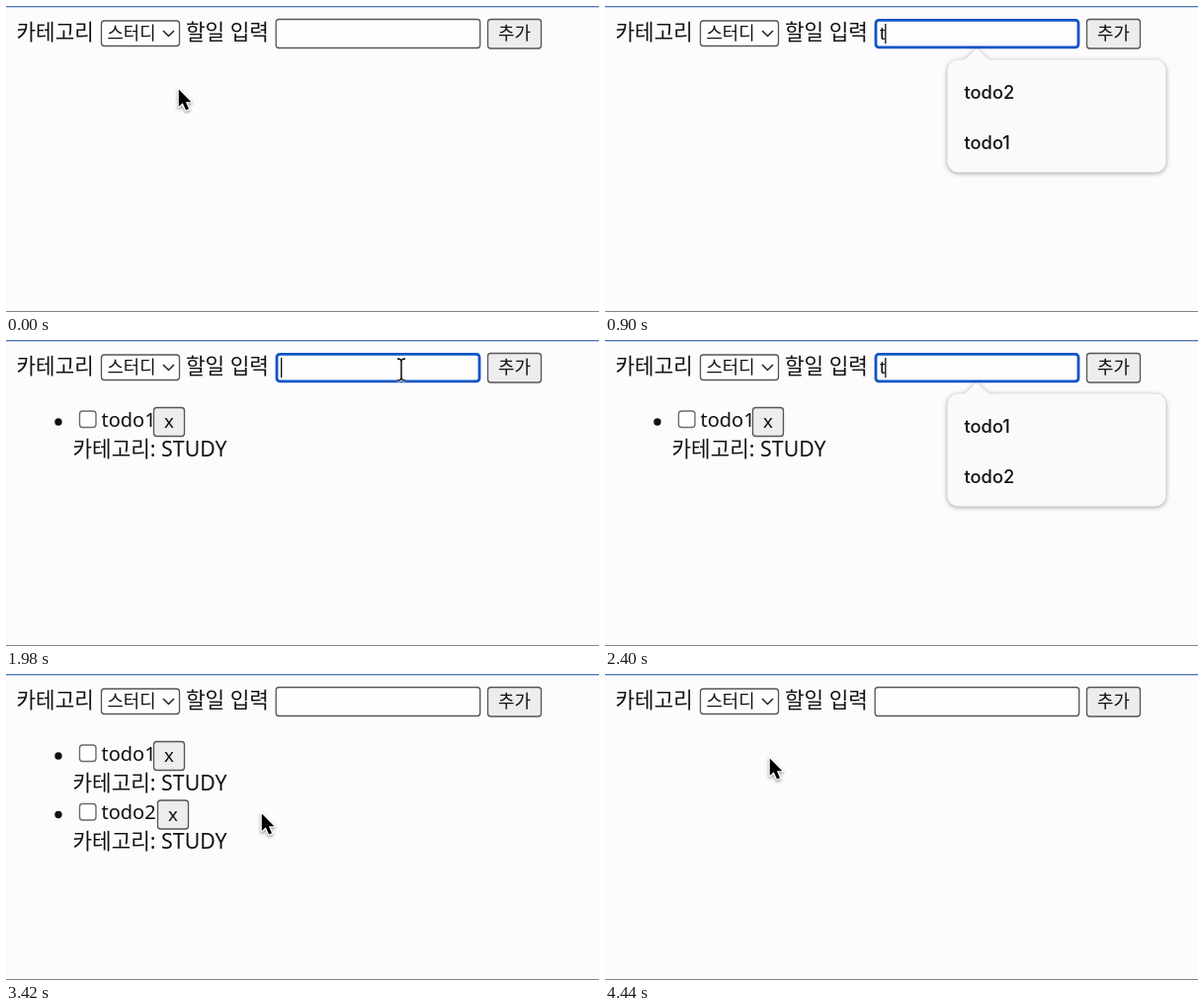
These frames come from a looping animation (600x310 px, 4860 ms). An HTML page with a canvas:

```html
<!DOCTYPE html>
<html lang="ko">
<head>
<meta charset="utf-8">
<style>
  html, body { margin: 0; width: 600px; height: 310px; overflow: hidden; }
  canvas { display: block; }
</style>
</head>
<body>
<canvas id="stage" width="600" height="310"></canvas>
<script>
const ctx = document.getElementById('stage').getContext('2d');
const LOOP = 4860, TICK = 60, ROW = 59.5;
const PAGE = '#fdfbfe', INK = '#111', BORDER = '#555', BLUE = '#0b55c4';
const KOREAN = '"Noto Sans", "Noto Sans CJK KR", sans-serif';
const ARIAL = '"Liberation Sans", Arial, sans-serif';

// [time, value] lists: the latest entry that has started applies.
const typed = [
  [0, ''], [720, 't'], [1020, 'to'], [1080, 'tod'], [1140, 'todo'], [1260, 'todo1'], [1740, ''],
  [2340, 't'], [2460, 'to'], [2520, 'tod'], [2580, 'todo'], [2700, 'todo2'], [3180, '']
];
const focus = [[0, false], [540, true], [1740, false], [1980, true], [3180, false]];
const caret = [[0, false], [540, true], [1440, false], [1980, true], [2880, false]];
const popup = [
  [0, null], [600, 'tall'], [720, null], [900, 'short'], [1320, null],
  [2100, 'tall'], [2340, null], [2400, 'short'], [2820, null]
];
const list = [
  [0, []], [1800, ['todo1']], [3240, ['todo1', 'todo2']], [3840, ['todo2']], [4440, []]
];
const pressed = [
  [0, false], [1740, true], [1800, false], [3180, true], [3240, false],
  [3720, true], [3840, false], [4320, true], [4380, false]
];
const pointerShown = [[0, true], [720, false], [1440, true], [2340, false], [2880, true]];
const pointerPath = [
  [0, 174, 83], [60, 174, 83], [180, 222, 74], [360, 365, 40], [480, 400, 30],
  [1380, 400, 30], [1440, 415, 28], [1560, 475, 20], [1680, 499, 25], [1740, 499, 25],
  [1920, 400, 30], [2820, 400, 30], [2880, 440, 30], [3000, 566, 29], [3120, 514, 33],
  [3180, 514, 33], [3360, 335, 112], [3420, 258, 140], [3540, 186, 108], [3660, 166, 84],
  [LOOP, 166, 84]
];

const at = (steps, t) => steps.filter(s => s[0] <= t).pop()[1];

function pointerAt(t) {
  const i = Math.max(1, pointerPath.findIndex(p => p[0] >= t));
  const [t0, x0, y0] = pointerPath[i - 1], [t1, x1, y1] = pointerPath[i];
  const k = (t - t0) / (t1 - t0);
  return { x: x0 + (x1 - x0) * k, y: y0 + (y1 - y0) * k };
}

const inside = (p, x, y, w, h) => p && p.x >= x && p.x <= x + w && p.y >= y && p.y <= y + h;

function text(str, x, y, font, align = 'left') {
  ctx.font = font;
  ctx.textAlign = align;
  ctx.fillStyle = INK;
  ctx.fillText(str, x, y);
}

function box(x, y, w, h, fill, stroke = BORDER, line = 1.3, radius = 3) {
  ctx.beginPath();
  ctx.roundRect(x, y, w, h, radius);
  ctx.fillStyle = fill;
  ctx.fill();
  ctx.strokeStyle = stroke;
  ctx.lineWidth = line;
  ctx.stroke();
}

function button(label, x, y, w, h, font, baseline, pointer, down) {
  const over = inside(pointer, x, y, w, h);
  box(x, y, w, h, over ? (down ? '#f4f3f5' : '#dddcde') : '#edecee');
  text(label, x + w / 2, baseline, font, 'center');
}

function drawForm(t, pointer) {
  text('카테고리', 10.5, 33.5, '21.3px ' + KOREAN);
  box(96.5, 15, 79, 25.5, '#fefdff');
  text('스터디', 102.5, 34, '17.8px ' + KOREAN);
  ctx.beginPath();
  ctx.moveTo(159, 25);
  ctx.lineTo(164.5, 30.5);
  ctx.lineTo(170, 25);
  ctx.strokeStyle = '#222';
  ctx.lineWidth = 1.5;
  ctx.stroke();

  text('할일 입력', 182, 33.5, '21.3px ' + KOREAN);
  if (at(focus, t)) box(274, 14.3, 205, 27.5, '#fefdff', BLUE, 2.8);
  else box(273.2, 13.5, 206.5, 29, '#fefdff');
  const value = at(typed, t);
  text(value, 278, 34, '18.66px ' + ARIAL);
  if (at(caret, t)) ctx.fillRect(278 + ctx.measureText(value).width, 18, 1.3, 20);

  button('추가', 487.5, 13.5, 54, 29.5, '17.9px ' + KOREAN, 33.7, pointer, at(pressed, t));
}

function drawItem(name, row, t, pointer) {
  const y = row * ROW;
  ctx.beginPath();
  ctx.arc(53, 83 + y, 3.7, 0, 7);
  ctx.fillStyle = INK;
  ctx.fill();
  box(74.5, 72 + y, 16.5, 16.5, '#fff', '#6b6b6b', 1.4);
  text(name, 96.5, 87.5 + y, '20px ' + KOREAN);
  button('x', name === 'todo1' ? 149.5 : 153.5, 68.5 + y, 31, 29,
    '500 18.66px ' + KOREAN, 89 + y, pointer, at(pressed, t));
  text('카테고리: STUDY', 67.5, 117.5 + y, '21.3px ' + KOREAN);
}

function drawPopup(size, names) {
  const bottom = size === 'tall' ? 330 : 168.5, left = 346.5, right = 567.5, top = 54.5, r = 11;
  ctx.save();
  ctx.beginPath();
  ctx.moveTo(left + r, top);
  ctx.lineTo(361, top);
  ctx.quadraticCurveTo(364, top, 367, 51.5);
  ctx.lineTo(374, 44.5);
  ctx.quadraticCurveTo(376, 43, 378, 44.5);
  ctx.lineTo(385, 51.5);
  ctx.quadraticCurveTo(388, top, 391, top);
  ctx.arcTo(right, top, right, bottom, r);
  ctx.arcTo(right, bottom, left, bottom, r);
  ctx.arcTo(left, bottom, left, top, r);
  ctx.arcTo(left, top, right, top, r);
  ctx.closePath();
  ctx.shadowColor = 'rgba(0,0,0,.38)';
  ctx.shadowBlur = 5;
  ctx.shadowOffsetY = 1;
  ctx.fillStyle = '#fcf9fc';
  ctx.fill();
  ctx.restore();
  names.forEach((name, i) => text(name, 363.5, 93.5 + i * 51, '500 18.3px Inter, sans-serif'));
}

function drawPointer({ x, y }) {
  ctx.save();
  ctx.translate(x, y);
  ctx.lineJoin = 'round';
  if (inside({ x, y }, 273, 13, 207, 30)) {
    const beam = new Path2D('M-4 -11Q0 -11 0 -8V8Q0 11 -4 11M4 -11Q0 -11 0 -8M0 8Q0 11 4 11');
    ctx.strokeStyle = '#fff';
    ctx.lineWidth = 3;
    ctx.stroke(beam);
    ctx.strokeStyle = '#000';
    ctx.lineWidth = 1.4;
    ctx.stroke(beam);
  } else {
    const arrow = new Path2D('M.8 1.5V19L4.8 15.3L8 22.5L11 21.2L7.9 14.2H13.3Z');
    ctx.shadowColor = 'rgba(0,0,0,.4)';
    ctx.shadowBlur = 3;
    ctx.shadowOffsetY = 1.5;
    ctx.strokeStyle = '#fff';
    ctx.lineWidth = 2.6;
    ctx.stroke(arrow);
    ctx.shadowColor = 'transparent';
    ctx.fillStyle = '#000';
    ctx.fill(arrow);
  }
  ctx.restore();
}

function draw(now) {
  const t = Math.floor(now % LOOP / TICK) * TICK;
  const pointer = at(pointerShown, t) ? pointerAt(t) : null;
  ctx.fillStyle = PAGE;
  ctx.fillRect(0, 0, 600, 310);
  ctx.fillStyle = '#4a73b4';
  ctx.fillRect(0, 0, 600, 1.3);
  ctx.fillStyle = '#858487';
  ctx.fillRect(0, 309, 600, 1);

  drawForm(t, pointer);
  at(list, t).forEach((name, row) => drawItem(name, row, t, pointer));
  const size = at(popup, t);
  if (size) drawPopup(size, t < 1800 ? ['todo2', 'todo1'] : ['todo1', 'todo2']);
  if (pointer) drawPointer(pointer);
}

function frame() {
  draw(performance.now());
  requestAnimationFrame(frame);
}
frame();
</script>
</body>
</html>
```
